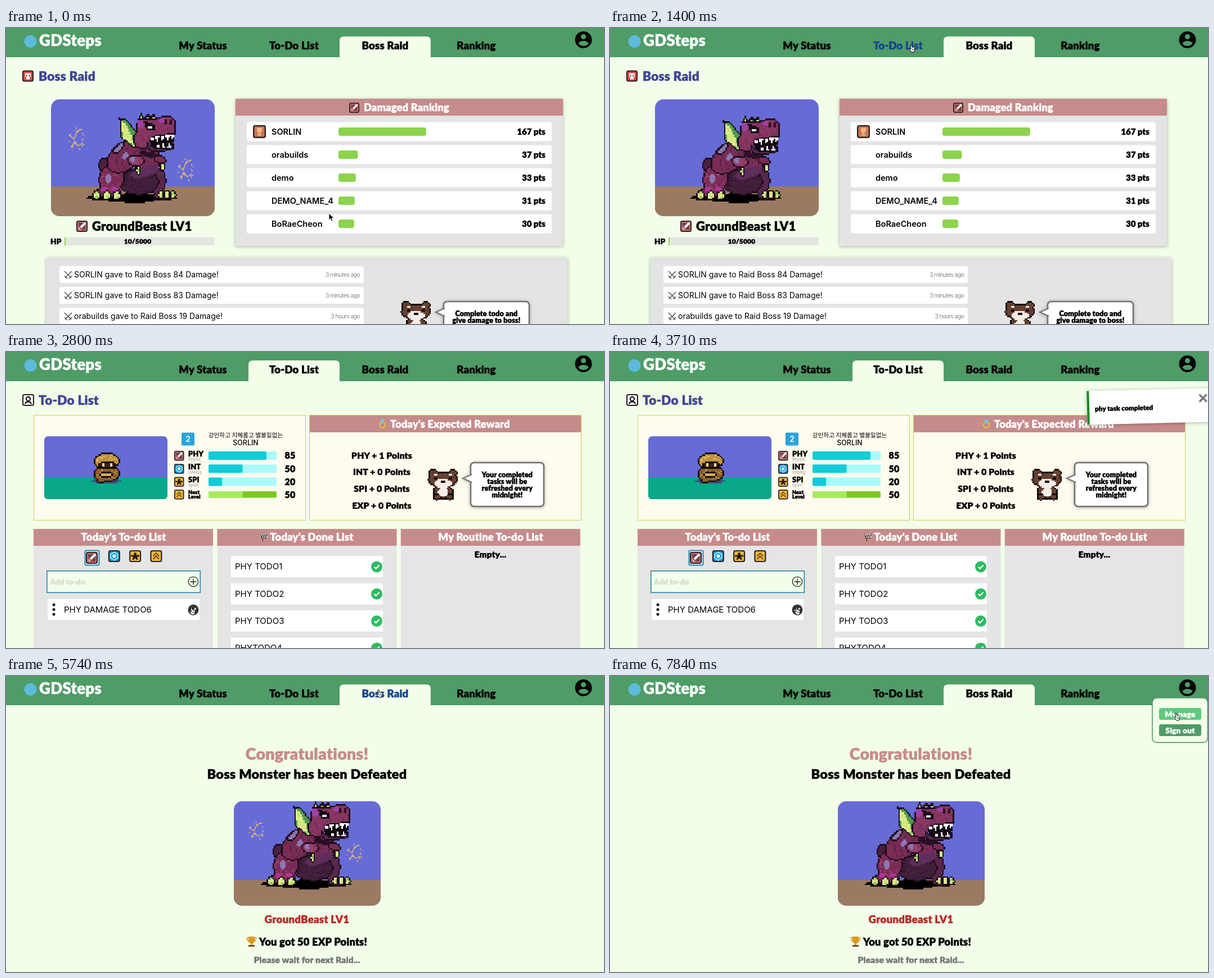
An HTML page that plays this animation: 1063 px wide and 527 px high, repeating every 8000 ms.

```html
<!DOCTYPE html>
<html lang="en">
<head>
<meta charset="utf-8">
<title>Boss raid</title>
<style>
html, body { margin: 0; width: 100%; height: 100%; overflow: hidden; background: #f2fee9; }
svg { display: block; width: 100vw; height: 100vh; }
text { white-space: pre; }
.r { font-family: Lato, "Open Sans", sans-serif; font-weight: 900; stroke-width: .55; stroke-linejoin: round; letter-spacing: .012em; }
.p { font-family: Inter, Roboto, sans-serif; }
.k { font-family: "Noto Sans CJK KR", "Noto Sans CJK", sans-serif; font-weight: 500; }
.shade { filter: drop-shadow(0 1px 3px rgba(0, 0, 0, .3)); }
.px { shape-rendering: crispEdges; }
</style>
</head>
<body>
<svg id="stage" viewBox="0 0 1063 527" preserveAspectRatio="none"></svg>
<script>
const ROSE = '#c68b8b', GREEN = '#4f9c67', PALE = '#f2fee9', GREY = '#e4e4e4', SKY = '#666bd6';
const HERO = 'SORLIN', BOSS = 'GroundBeast LV1';

// y is the middle of the capitals
const label = (cls, anchor) => (x, y, size, str, fill = '#000', extra = '') =>
  `<text class="${cls}" x="${x}" y="${(y + size * .36).toFixed(1)}" font-size="${size}" text-anchor="${anchor}" fill="${fill}"${cls === 'r' ? ` stroke="${fill}"` : ''} ${extra}>${str}</text>`;
const mid = label('r', 'middle'), left = label('r', 'start'), right = label('r', 'end');
const plain = label('p', 'start'), plainEnd = label('p', 'end'), plainMid = label('p', 'middle');

const box = (x, y, w, h, fill, r = 0, extra = '') =>
  `<rect x="${x}" y="${y}" width="${w}" height="${h}" rx="${r}" fill="${fill}" ${extra}/>`;
const line = (d, color, w = 2, extra = '') =>
  `<path d="${d}" fill="none" stroke="${color}" stroke-width="${w}" ${extra}/>`;
const shape = (d, fill) => `<path d="${d}" fill="${fill}"/>`;
const disc = (x, y, r, fill, extra = '') => `<circle cx="${x}" cy="${y}" r="${r}" fill="${fill}" ${extra}/>`;
const group = (body, attrs = '') => `<g ${attrs}>${body}</g>`;
const repeat = (n, make) => Array.from({ length: n }, (_, i) => make(i)).join('');
const pair = make => make(-1) + make(1);

let seed = 7;
const rnd = () => (seed = seed * 16807 % 2147483647) / 2147483647;

// Pixel art: areas are tested cell by cell
const CELL = 2.6;
const oval = (cx, cy, rx, ry, tilt = 0) => {
  const c = Math.cos(tilt), s = Math.sin(tilt), r = Math.max(rx, ry);
  return {
    area: [cx - r, cy - r, cx + r, cy + r],
    has: (x, y) => ((c * (x - cx) + s * (y - cy)) / rx) ** 2 + ((c * (y - cy) - s * (x - cx)) / ry) ** 2 < 1
  };
};
const poly = points => {
  const p = points.split(' ').map(q => q.split(',').map(Number));
  const xs = p.map(q => q[0]), ys = p.map(q => q[1]);
  return {
    area: [Math.min(...xs), Math.min(...ys), Math.max(...xs), Math.max(...ys)],
    has: (x, y) => p.reduce((hit, [ax, ay], i) => {
      const [bx, by] = p[(i + 1) % p.length];
      return (ay > y) !== (by > y) && x < (bx - ax) * (y - ay) / (by - ay) + ax ? !hit : hit;
    }, false)
  };
};
// Joins the areas; border cells take the edge colour, some others the fleck colour
function paint(areas, fill, edge, fleck) {
  const has = (x, y) => areas.some(a => a.has(x, y));
  const [x0, y0, x1, y1] = [0, 1, 2, 3].map(k => (k < 2 ? Math.min : Math.max)(...areas.map(a => a.area[k])));
  const cells = {};
  for (let y = (Math.floor(y0 / CELL) + .5) * CELL; y < y1; y += CELL) {
    for (let x = (Math.floor(x0 / CELL) + .5) * CELL; x < x1; x += CELL) {
      if (!has(x, y)) continue;
      const inner = has(x - CELL, y) && has(x + CELL, y) && has(x, y - CELL) && has(x, y + CELL);
      const color = edge && !inner ? edge : fleck && rnd() < .16 ? fleck : fill;
      cells[color] = (cells[color] || '') + `M${(x - CELL / 2).toFixed(1)} ${(y - CELL / 2).toFixed(1)}h${CELL}v${CELL}h-${CELL}z`;
    }
  }
  return Object.entries(cells).map(([color, d]) => `<path class="px" fill="${color}" d="${d}"/>`).join('');
}

// Icons on a 20 unit square
const glyphs = {
  sword: ['#e0827c', box(3.5, 3.5, 13, 13, '#6b4550') + line('M5 15L16 4', '#f1f3f5', 4) + line('M4 10l6 6', '#d5504a', 2.4)],
  mind: ['#1795cf', line('M10 3l6 4v6l-6 4-6-4V7z', '#8be9fb') + disc(10, 10, 3, '#d9fbff')],
  spirit: ['#eab93c', shape('M8 4h4v4h5v3h-4l2 5h-3l-2-3-2 3H5l2-5H3V8h5z', '#241a10')],
  level: ['#eab93c', line('M5 10l5-5 5 5M5 15l5-5 5 5', '#7a4b12')],
  skull: ['#d9493f', shape('M5 5h10v7h-2v4H7v-4H5z', '#fff') + pair(s => box(9 + 2.5 * s, 8, 2, 3, '#8b2520'))],
  person: ['#fff', disc(10, 8, 3.4, 'none', 'stroke="#111" stroke-width="2"') + line('M5 17q0-4 5-4t5 4', '#111')],
  cup: ['#c9774c', shape('M6 4h8v5l-2 3h-1v2h2v2H7v-2h2v-2H8L6 9z', '#f1b48a')]
};
const icon = (name, x, y, size) => group(
  box(1, 1, 18, 18, glyphs[name][0], 2.5, 'stroke="#2a1c22" stroke-width="2"') + glyphs[name][1],
  `transform="translate(${x} ${y}) scale(${size / 20})"`);
const tick = (x, y, r, fill) => disc(x, y, r, fill) + line(`M${x - 4.5} ${y}l3.2 3.2 5.8-6.2`, '#fff', 2.2);

// The dragon, built from three parts
const INK = '#1d0d1c', LIME = '#d9ea86', LEAF = '#4f9a4d', WINE = '#7b2c55', PLUM = '#59264c', LILAC = '#8a78b4';
const claw = (x, y, rx, ry) => paint([oval(x, y, rx, ry)], LIME, INK, '#8cc25c');
const legs =
  paint([oval(223, 302, 81, 7), oval(228, 304, 28, 9)], '#000') +
  paint([oval(175, 244, 11, 13)], '#4a2040', INK) +
  paint([oval(268, 272, 17, 24), oval(280, 297, 18, 9)], PLUM, INK) +
  paint([oval(236, 274, 36, 24)], '#42203c', INK, '#35162f') +
  paint([oval(188, 268, 23, 27, .3), oval(181, 293, 25, 10)], WINE, INK, '#96406a') +
  paint([oval(182, 268, 6, 8), oval(200, 250, 5, 9, .6)], LILAC) +
  repeat(2, i => paint([oval(174 + 19 * i, 287, 6, 4)], '#b032a0')) +
  repeat(3, i => claw(161 + 18 * i, 298, 7.5, 9)) + repeat(3, i => claw(275 + 11 * i, 297, 6, 8));
const torso =
  paint([oval(212, 228, 38, 25, -.7), oval(250, 234, 26, 24)], WINE, INK, PLUM) +
  paint([oval(200, 214, 6, 14, .8)], LILAC, INK) +
  paint([oval(246, 256, 25, 9, -.3)], '#5f2d5c') + paint([oval(258, 226, 22, 5, .2)], '#2b1024') +
  paint([oval(212, 228, 5, 7, .6)], LILAC) +
  paint([oval(231, 236, 15, 11)], '#96406a', INK, WINE) + paint([oval(226, 234, 4, 5)], LILAC) + claw(235, 253, 5, 9) +
  paint([oval(274, 234, 12, 8, .4)], WINE, INK) + claw(278, 248, 5.5, 8);
const tooth = (x, y, h) => paint([poly(`${x - 4},${y} ${x + 4},${y} ${x},${y + h}`)], '#fff');
const head =
  paint([poly('201,159 214,163 232,184 248,216 224,212 204,194')], LEAF, INK) +
  paint([poly('204,164 212,170 222,190 228,210 208,196')], LIME, '', '#c3dc74') +
  paint([oval(242, 198, 16, 18), oval(254, 176, 23, 20), poly('250,161 292,155 302,166 302,189 270,193 250,202')], '#873661', INK, '#6d2c58') +
  paint([oval(240, 170, 6, 9), oval(277, 165, 6, 4)], '#a040a4') +
  paint([poly('244,165 266,172 264,182 250,182')], '#150912') + box(252, 175, 8, 4, '#e8f3ff') +
  repeat(2, i => box(282 + 9 * i, 163, 4, 9, '#2b1024')) +
  repeat(3, i => paint([poly(`${234 + 11 * i},165 ${241 + 11 * i},150 ${247 + 11 * i},164`)], LIME, INK, LEAF)) +
  paint([poly('248,200 262,212 290,214 298,204 298,216 276,222 252,219')], PLUM, INK) +
  paint([poly('254,198 266,190 300,188 297,206 284,214 260,212')], '#120710') +
  repeat(5, i => tooth(260 + 9 * i, 194 - i, 10)) + repeat(3, i => tooth(270 + 10 * i, 214, -9));
const dragon = group(legs) + group(torso, 'class="torso"') + group(head, 'class="head"');

const rough = repeat(17, i => {
  const a = i * 2.4, r = 9 + 6 * rnd();
  return `M${(Math.cos(a) * r).toFixed(1)} ${(Math.sin(a) * r * 1.35).toFixed(1)}l${(8 * rnd() - 4).toFixed(1)} ${(12 * rnd() - 6).toFixed(1)}`;
});
const scrawl = (x, y) => group(line(rough + 'M-14 -6l9 8 5 -14 10 -4M-9 15l5 -9 6 8 9 -6', '#e6bb74', 1.5), `class="scrawl" data-at="${x} ${y}"`);
const scrawls2 = scrawl(126, 196) + scrawl(320, 251);
const scene = (id, x, y, w, h, floor, sprite, marks) =>
  `<clipPath id="${id}">${box(x, y, w, h, '#000', 15)}</clipPath>` + group(
    box(x, y, w, h, SKY) + box(x, floor, w, h, '#9a7a62') + group(dragon, sprite) + marks, `clip-path="url(#${id})"`);

const FUR = '#694232', NIGHT = '#120b09', MILK = '#f4ece6';
const bear =
  paint([oval(759, 216, 8, 8), oval(795, 216, 8, 8), oval(777, 227, 27, 15), oval(777, 249, 19, 13)], FUR, NIGHT, '#5a3628') +
  pair(s => paint([oval(777 + 11 * s, 258, 8, 6)], FUR, NIGHT) + box(774 + 13 * s, 223, 6, 4, NIGHT) + box(774 + 13 * s, 217, 6, 3, MILK)) +
  paint([oval(777, 234, 15, 8), oval(777, 250, 9, 8)], MILK) + box(773, 229, 8, 4, NIGHT);
const hooded =
  paint([oval(178, 230, 27, 4)], '#3c4a7c') + paint([oval(179, 217, 24, 15), oval(168, 229, 8, 5)], '#8a5c2b', NIGHT, '#c0913f') +
  paint([oval(179, 194, 23, 15)], '#c0913f', NIGHT, '#e0ba62') + paint([oval(180, 201, 16, 7)], '#3a2415', NIGHT) +
  pair(s => box(178 + 7 * s, 198, 4, 6, '#f3d9a4')) + paint([oval(178, 218, 12, 6)], '#d1a552', NIGHT);
const bubble = (x, y, w, h, ty) => group(
  box(x, y, w, h, '#fff', 6, 'stroke="#707070" stroke-width="2.5"') +
  `<path d="M${x + 2} ${ty - 7}L${x - 14} ${ty}L${x + 2} ${ty + 7}" fill="#fff" stroke="#707070" stroke-width="2"/>`, 'class="shade"');

const ranks = [[HERO, 167], ['orabuilds', 37], ['demo', 33], ['DEMO_NAME_4', 31], ['BoRaeCheon', 30]];
const hits = [[HERO, 84, '3 minutes'], [HERO, 83, '3 minutes'], ['orabuilds', 19, '3 hours']];
const raidPage =
  icon('skull', 29, 75.5, 20) + left(58, 86, 22.5, 'Boss Raid', '#3f4593') +
  scene('den', 80, 127, 291, 208, 282, '', scrawls2) +
  icon('sword', 125, 343, 20) + left(153, 353, 22, BOSS) +
  left(79, 380, 13.5, 'HP') + box(104, 372.5, 267, 14.5, '#e4e6e4', 2) + box(104, 372.5, 2, 14.5, '#8cd44c') + mid(234, 380, 12, '10/5000') +
  group(box(408, 126, 582, 262, GREY, 2), 'class="shade"') + box(408, 126, 582, 30, ROSE) +
  icon('sword', 610, 133, 18) + left(636, 141, 18.2, 'Damaged Ranking', '#fff') +
  ranks.map(([name, pts], i) => {
    const y = 184.5 + 41 * i;
    return box(428, y - 17, 542, 34, '#fff', 3) + plain(472, y, 14.5, name, '#000', 'font-weight="600"') +
      box(591, y - 7.5, pts * .933, 15, '#8cd44c', 4) + right(959, y, 14.6, pts + ' pts');
  }).join('') + icon('cup', 439, 173, 23) +
  group(box(72, 409, 926, 130, GREY, 3), 'class="shade"') +
  hits.map(([name, n, ago], i) => {
    const y = 439 + 37 * i;
    return box(95, y - 15, 541, 30, '#fff', 3) + line(`M104 ${y - 6}l12 12M117 ${y - 6}l-12 12M104 ${y + 2}l5 5M117 ${y + 2}l-5 5`, '#555', 1.5) +
      plain(121, y, 14, `${name} gave to Raid Boss ${n} Damage!`) + plainEnd(629, y, 10.5, ago + ' ago', '#8a8a8a', 'letter-spacing="-.7"');
  }).join('') +
  group(bear, 'transform="translate(-48 278)"') + bubble(778, 487, 152, 60, 506) +
  mid(854, 508, 12.6, 'Complete todo and') + mid(854, 520, 12.6, 'give damage to boss!');

const stats = [['PHY', 'Physic', 85, 'sword'], ['INT', 'Intellig', 50, 'mind'], ['SPI', 'Spirit', 20, 'spirit']];
const columns = ["Today's To-do List", "Today's Done List", 'My Routine To-do List'];
const panel = x => box(x, 112.5, 483, 187, '#fefcee', 0, 'stroke="#cfcf52"');
const ring = disc(669, 130, 5, 'none', 'stroke="#e8b93a" stroke-width="2.4"') + shape('M665 123l2-3h4l2 3-4 4z', '#67c8ee');
const flag = line('M453 324l4 13', '#6b4a35', 1.5) + box(454, 324, 10, 8, '#333') +
  repeat(6, i => box(454 + i * 1.7, i % 2 ? 328 : 324, 2, 3, '#eee'));
const todoPage =
  icon('person', 29, 75, 21) + left(58, 86, 22.5, 'To-Do List', '#3f4593') +
  panel(49.5) + box(68, 150, 219, 112, SKY, 7) + shape('M68 223h219v32q0 7-7 7H75q-7 0-7-7z', '#09a88a') + hooded +
  box(312, 143.5, 23, 23, '#2ba3dc', 2) + plainMid(323.5, 155, 14, '2', '#fff', 'font-weight="600"') +
  label('k', 'middle')(426, 148, 10.7, '강인하고 지혜롭고 별볼일없는') + plainMid(426, 161, 12.4, HERO, '#000', 'font-weight="500"') +
  stats.map(([name, sub, n, pic], i) => {
    const y = 184.5 + 23.2 * i;
    return icon(pic, 299, y - 8.5, 17.5) + left(324, y - 3.5, 12.8, name) + plain(324, y + 6.5, 7.5, sub, '#999') +
      box(360, y - 7.5, 121, 15, '#aafafd', 2) + box(360, y - 7.5, 1.21 * n, 15, '#14cbd8', 2) + mid(505, y, 16, n);
  }).join('') +
  icon('level', 299, 245, 17.5) + left(324, 249.5, 9, 'Next') + left(324, 258, 9, 'Level') +
  box(360, 248, 121, 11.5, '#7bc922', 2) + box(360, 248, 60.5, 11.5, '#a6ea62', 2) + mid(505, 254, 16, '50') +
  panel(539.5) + box(540, 113, 482, 30, ROSE) + ring + mid(789.5, 128, 18.2, "Today's Expected Reward", '#fff') +
  ['PHY + 1', 'INT + 0', 'SPI + 0', 'EXP + 0'].map((s, i) => mid(668, 184 + 29.7 * i, 15.6, s + ' Points')).join('') +
  bear + bubble(826, 197, 130, 78, 225) +
  ['Your completed', 'tasks will be', 'refreshed every', 'midnight!'].map((s, i) => mid(891, 218 + 12 * i, 12.5, s)).join('') +
  columns.map((s, i) => {
    const x = 49 + 326.4 * i;
    return box(x, 315, 319, 212, '#e5e5e5') + box(x, 315, 319, 30, ROSE) + mid(x + 160, 329.5, 18.4, s, '#fff', i === 1 ? 'dx="8"' : '');
  }).join('') + flag +
  box(140.5, 353.5, 25, 26, '#dff1fa', 2, 'stroke="#2187b5" stroke-width="2"') + icon('sword', 142, 356, 21) +
  ['mind', 'spirit', 'level'].map((s, i) => icon(s, 181.8 + 37.3 * i, 353, 21)).join('') +
  box(72.8, 389.8, 272.5, 38.5, PALE, 0, 'stroke="#2285b0" stroke-width="1.6"') + left(78, 409, 13.4, 'Add to-do', '#d6dcd2') +
  disc(333, 409, 8.7, 'none', 'stroke="#222" stroke-width="1.3"') + line('M327.5 409h11M333 403.5v11', '#222', 1.3) +
  group(box(74, 440, 270, 37, '#fff') + repeat(3, i => disc(85, 450 + 8.5 * i, 2.5, '#111')) +
    plain(103, 459, 15, 'PHY DAMAGE TODO6') + tick(333, 459, 9.5, '#333638'), 'id="task"') +
  ['PHY TODO1', 'PHY TODO2', 'PHY TODO3', 'PHYTODO4'].map((s, i) => {
    const y = 382 + 48.3 * i;
    return box(400, y - 18.5, 270, 37.5, '#fff') + plain(407, y, 15, s) + tick(659, y + .5, 10, '#2fba62');
  }).join('') + mid(861, 360, 15.4, 'Empty...');

const loadPage = disc(543, 318.5, 33, 'none', 'stroke="#d9dcd8" stroke-width="4"') +
  disc(0, 0, 33, 'none', 'id="arc" stroke="#74bffd" stroke-width="8" stroke-linecap="round" pathLength="360" stroke-dasharray="315 45"');

const cup = shape('M431 464h11v7q-1 5-4 5v3h3v3h-9v-3h3v-3q-3 0-4-5z', '#d99a1e') +
  line('M431 466h-2.5q0 6 4 7M442 466h2.5q0 6-4 7', '#d99a1e', 1.6) + box(431, 479, 11, 3, '#7a4a20');
const winPage = mid(535, 139, 28.5, 'Congratulations!', ROSE) + mid(535, 175, 23.4, 'Boss Monster has been Defeated') +
  scene('arena', 405, 223, 261, 186, 363, 'transform="translate(310 68)"',
    group(scrawls2, 'transform="translate(333 133) scale(.897 .72)"')) +
  mid(535, 433, 18.7, BOSS, '#b92a2a') + cup + mid(546, 473, 18.2, 'You got 50 EXP Points!') +
  mid(535, 505, 15.5, 'Please wait for next Raid...', '#757875');

const tabs = ['My Status', 'To-Do List', 'Boss Raid', 'Ranking'];
const TAB_X = 269, TAB_W = 162;
const bar = box(0, 0, 1063, 52, GREEN) + disc(43.5, 24, 11, '#5cbbdc') + left(59, 22, 27.5, 'GDSteps', '#fff') +
  '<path id="tab" d="M0 52V23q0-8 8-8h146q8 0 8 8v29z" fill="#f2fee9"/>' +
  tabs.map((s, i) => group(mid(TAB_X + TAB_W * (i + .5), 31, 18.5, s, 'inherit', 'style="stroke:inherit"'), 'class="tab"')).join('') +
  disc(1026.5, 21, 15, '#050505') + disc(1026.5, 15.5, 4.6, GREEN) + shape('M1017.5 27.5q2-4.5 9-4.5t9 4.5q-3.5 4.5-9 4.5t-9-4.5z', GREEN);
const menu = box(964, 39, 98.4, 79.4, PALE, 8, 'stroke="#4f9c67" stroke-width="1.6"') +
  box(976, 57, 75, 21, GREEN, 4, 'id="mine"') + mid(1013.5, 68, 13.8, 'My page', '#fff') +
  box(976, 86, 75, 21, GREEN, 4) + mid(1013.5, 96.5, 13.8, 'Sign out', '#fff');
const toast = group(box(848, 67, 230, 60, '#fff'), 'class="shade"') + box(848, 67, 4, 60, '#0b8a1e') +
  left(862, 99, 11.5, 'phy task completed') + line('M1048 78l13 13M1061 78l-13 13', '#777', 3.4);
const pointer =
  group('<path d="M0 0V12l2.8-2.6 2 4.6 2.2-1-2-4.4H9z" fill="#000" stroke="#fff" stroke-width=".9"/>', 'id="arrow"') +
  group('<path d="M3 1q1.5-1 2 .5L6 5q4 0 5 2l-.5 4-1.5 3H5L1 9q-.5-2 1.3-1.2L4 9z" fill="#fff" stroke="#000"/>' + line('M6.5 8v3M8.5 8v3', '#000', .7), 'id="hand"');

const $ = id => document.getElementById(id);
const all = cls => [...document.querySelectorAll('.' + cls)];
const layers = { raid: raidPage, todo: todoPage, load: loadPage, win: winPage, bar, menu, toast, pointer };
$('stage').innerHTML = Object.entries(layers).map(([id, body]) => group(body, `id="${id}"`)).join('');
const heads = all('head'), torsos = all('torso'), scrawls = all('scrawl'), tabTexts = all('tab');

const LOOP = 8000, STEP = 70, TOAST_IN = 3430, TASK_GONE = 3850, MENU_IN = 7000;
const pages = [[0, 'raid'], [1540, 'todo'], [5110, 'load'], [5320, 'win']];
const LOAD_IN = pages[2][0];
// Each move: start, end, goal
const moves = [
  [0, 980, 531, 29], [1610, 2170, 311, 453], [2520, 2870, 327, 454], [3780, 4200, 692, 30],
  [4200, 4620, 649, 24], [5670, 6440, 1037, 14], [6930, 7350, 1002, 65]];

const clamp = v => Math.min(1, Math.max(0, v));
const ease = f => f * f * (3 - 2 * f);
const cursorAt = t => moves.reduce(([x, y], [from, to, gx, gy]) => {
  const f = ease(clamp((t - from) / (to - from)));
  return [x + (gx - x) * f, y + (gy - y) * f];
}, [574, 330]);
const show = (el, on) => { el.style.display = on ? '' : 'none'; };
const move = (el, v) => el.setAttribute('transform', v);

function drawDragon(t) {
  const pose = Math.floor(t % 1000 / 100);
  const sink = 2.5 - 2.5 * Math.cos(pose * Math.PI * 2 / 9);
  heads.forEach(el => move(el, `translate(0 ${Math.round(sink)})`));
  torsos.forEach(el => move(el, `translate(0 ${Math.round(sink / 2)})`));
  const beat = (pose + 1) % 10, size = .85 + .3 * Math.sin(beat * Math.PI / 6);
  scrawls.forEach(el => {
    show(el, beat < 5);
    move(el, `translate(${el.dataset.at}) scale(${size})`);
  });
}

function draw(t) {
  const page = pages.filter(p => p[0] <= t).pop()[1];
  pages.forEach(p => show($(p[1]), p[1] === page));
  drawDragon(page === 'win' ? t + 560 : t);

  const [x, y] = cursorAt(t);
  const over = (l, r, top, bottom) => x >= l && x <= r && y >= top && y <= bottom;
  move($('tab'), `translate(${TAB_X + TAB_W * (page === 'todo' ? 1 : 2)} 0)`);
  const hot = over(TAB_X, TAB_X + TAB_W * 4 - 1, 15, 52) ? Math.floor((x - TAB_X) / TAB_W) : -1;
  tabTexts.forEach((el, i) => { el.style.fill = el.style.stroke = i === hot ? '#17478f' : '#000'; });

  const menuOpen = t >= MENU_IN, onMine = menuOpen && over(976, 1051, 57, 78);
  show($('menu'), menuOpen);
  $('mine').setAttribute('fill', onMine ? '#60c87f' : GREEN);

  const taskOpen = t < TASK_GONE;
  show($('task'), taskOpen);
  const onTick = page === 'todo' && taskOpen && over(322, 343, 449, 469);

  show($('toast'), t >= TOAST_IN && t < LOAD_IN);
  const age = t - TOAST_IN;
  const slide = 230 * (1 - clamp(age / 280)) ** 3, tilt = -8 * Math.exp(-age / 160);
  move($('toast'), `translate(${slide} 0) rotate(${tilt} 955 97)`);
  move($('arc'), `translate(543 318.5) rotate(${225 + (t - LOAD_IN) * .36})`);

  const hand = hot >= 0 || onMine || onTick || over(1011, 1042, 6, 36);
  show($('hand'), hand);
  show($('arrow'), !hand);
  move($('pointer'), `translate(${x.toFixed(1)} ${y.toFixed(1)})`);
}

const start = performance.now();
function loop() {
  const t = (performance.now() - start) % LOOP;
  draw(Math.floor(t / STEP) * STEP);
  requestAnimationFrame(loop);
}
loop();
</script>
</body>
</html>
```
